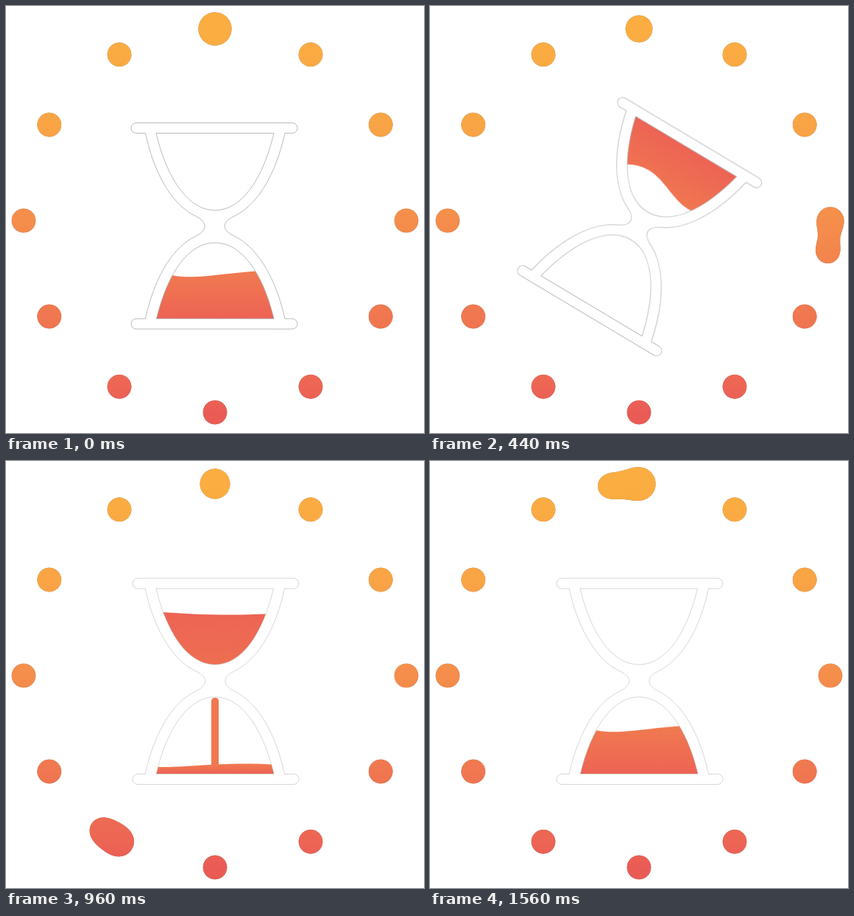
An HTML page without scripts for the animation above (1.6 s loop, 568 by 579 pixels).

```html
<!DOCTYPE html>
<html lang="en">
<head>
<meta charset="utf-8">
<title>Hourglass loader</title>
<style>
  html, body { margin: 0; width: 100%; height: 100%; overflow: hidden; background: #fff; }
  svg { display: block; width: 568px; height: 579px; }

  .ring { filter: drop-shadow(0 0 .5px #888); }
  .dot, .runner { transform-origin: 284px 291px; }
  .dot {
    transform: rotate(calc(var(--i) * 30deg));
    animation: pulse 1.6s linear calc(var(--i) * 1.6s / 12 - 1.6s) infinite;
  }
  .dot.first { animation: swell 1.6s linear infinite; }
  .runner { animation: orbit 1.6s linear infinite; }

  .glass { transform-origin: 284px 298.5px; animation: flip 1.6s infinite; }
  .outline { fill: none; stroke: #aaa; stroke-width: .8; animation: fade 1.6s step-end infinite; }
  .draining { animation: drain 1.6s ease-in-out infinite; }
  .filling { animation: fill 1.6s linear infinite; }
  .stream { animation: pour 1.6s linear infinite; }
  .tint { animation: tint 1.6s linear infinite; }

  @keyframes orbit { to { transform: rotate(360deg); } }
  @keyframes pulse {
    0%, 98.3%, 100% { r: 20.4px; }
    2.5% { r: 17.3px; }
    3.3% { r: 17.1px; }
    4.2%, 95.8% { r: 16px; }
  }
  @keyframes swell {
    0%, 100% { r: 20.4px; }
    2.5% { r: 17.4px; }
    4.2% { r: 16.2px; }
  }
  @keyframes flip {
    0% { transform: rotate(0deg); animation-timing-function: cubic-bezier(.25, 0, .58, 1); }
    34.4% { transform: rotate(227deg); animation-timing-function: ease-in-out; }
    51.2%, 100% { transform: rotate(180deg); }
  }
  @keyframes fade { 0% { stroke-opacity: 1; } 51.2%, 100% { stroke-opacity: .6; } }

  /* Base edge first, then the free surface from right to left */
  @keyframes drain {
    0% { d: path("M200 424C240 424 310 424 372 424L370 358C285 360 245 378 205 358Z"); }
    15% { d: path("M200 424C240 424 310 424 372 424L370 356C300 328 250 340 205 366Z"); }
    27.5% { d: path("M200 424C240 424 310 424 372 424L370 336C300 420 262 318 205 366Z"); }
    37.5% { d: path("M200 424C240 424 310 424 372 424L370 384C300 318 255 352 205 374Z"); }
    52.5% {
      d: path("M200 424C240 424 310 424 372 424L370 341C315 332 260 323 205 314Z");
      animation-timing-function: linear;
    }
    70% {
      d: path("M200 346C240 340 310 338 372 354L370 312C315 312 260 312 205 312Z");
      animation-timing-function: linear;
    }
    81%, 100% { d: path("M200 312C240 312 310 312 372 312L370 312C315 312 260 312 205 312Z"); }
  }
  @keyframes fill {
    0%, 52.5% { d: path("M200 424L205 424C245 424 285 424 370 424L372 424Z"); }
    70% { d: path("M200 424L195 402C240 408 290 384 370 396L372 424Z"); }
    94%, 100% { d: path("M200 424L205 358C245 378 285 360 370 358L372 424Z"); }
  }
  @keyframes pour {
    0%, 50% { transform: translateY(-120px); }
    52.5% { transform: translateY(-89px); }
    58.5%, 81% { transform: translateY(0); }
    88%, 100% { transform: translateY(120px); }
  }
  @keyframes tint { 0%, 52.5% { stop-color: #f07b50; } 70%, 100% { stop-color: #ec6054; } }
</style>
</head>
<body>
<svg viewBox="0 0 568 579">
  <defs>
    <linearGradient id="warm" gradientUnits="userSpaceOnUse" x1="0" y1="31" x2="0" y2="551">
      <stop offset="0" stop-color="#fbad41"/>
      <stop offset=".25" stop-color="#f9a445"/>
      <stop offset=".5" stop-color="#f58d4b"/>
      <stop offset=".75" stop-color="#f07750"/>
      <stop offset=".93" stop-color="#ed6554"/>
      <stop offset="1" stop-color="#ea5b55"/>
    </linearGradient>
    <linearGradient id="oldSand" x2="0" y2="1">
      <stop class="tint" stop-color="#f07b50"/>
      <stop offset="1" stop-color="#ed6354"/>
    </linearGradient>
    <linearGradient id="newSand" x2="0" y2="1">
      <stop stop-color="#f07b50"/>
      <stop offset="1" stop-color="#ed6354"/>
    </linearGradient>

    <filter id="goo" filterUnits="userSpaceOnUse" x="-40" y="-40" width="648" height="659" color-interpolation-filters="sRGB">
      <feGaussianBlur stdDeviation="14"/>
      <feColorMatrix values="1 0 0 0 0  0 1 0 0 0  0 0 1 0 0  0 0 0 50 -14.8" result="blob"/>
      <feMerge><feMergeNode in="blob"/><feMergeNode in="SourceGraphic"/></feMerge>
    </filter>
    <mask id="dots" maskUnits="userSpaceOnUse" x="0" y="0" width="568" height="579" style="mask-type: alpha">
      <g fill="#fff" filter="url(#goo)">
        <circle class="dot first" style="--i:0" cx="284" cy="31" r="16"/>
        <circle class="dot" style="--i:1" cx="284" cy="31" r="16"/>
        <circle class="dot" style="--i:2" cx="284" cy="31" r="16"/>
        <circle class="dot" style="--i:3" cx="284" cy="31" r="16"/>
        <circle class="dot" style="--i:4" cx="284" cy="31" r="16"/>
        <circle class="dot" style="--i:5" cx="284" cy="31" r="16"/>
        <circle class="dot" style="--i:6" cx="284" cy="31" r="16"/>
        <circle class="dot" style="--i:7" cx="284" cy="31" r="16"/>
        <circle class="dot" style="--i:8" cx="284" cy="31" r="16"/>
        <circle class="dot" style="--i:9" cx="284" cy="31" r="16"/>
        <circle class="dot" style="--i:10" cx="284" cy="31" r="16"/>
        <circle class="dot" style="--i:11" cx="284" cy="31" r="16"/>
        <circle class="runner" cx="284" cy="31" r="16"/>
      </g>
    </mask>

    <path id="bulb" d="M204.5 424H364C349 362 320 321 284 321S219.5 362 204.5 424Z"/>
    <clipPath id="inBulb"><use href="#bulb"/></clipPath>
  </defs>

  <g class="ring"><rect width="568" height="579" fill="url(#warm)" mask="url(#dots)"/></g>

  <g clip-path="url(#inBulb)">
    <rect class="stream" x="279" y="321" width="10" height="119" rx="4.5" fill="#f07850"/>
    <path class="filling" fill="url(#newSand)" d="M200 424L205 424C245 424 285 424 370 424L372 424Z"/>
  </g>

  <g class="glass">
    <g clip-path="url(#inBulb)">
      <path class="draining" fill="url(#oldSand)" d="M200 424C240 424 310 424 372 424L370 358C285 360 245 378 205 358Z"/>
    </g>
    <g class="outline">
      <path d="M177 158.5H389a7 7 0 0 1 0 14H379C365 235 338 272 310 285C293 293 293 304 310 312C338 325 365 362 379 424H389a7 7 0 0 1 0 14H177a7 7 0 0 1 0-14H189.5C203 362 230 325 258 312C274 304 274 293 258 285C230 272 203 235 189.5 172.5H177a7 7 0 0 1 0-14Z"/>
      <use href="#bulb"/>
      <path d="M204 172.5H364C349 235 320 277 284 277S219 235 204 172.5Z"/>
    </g>
  </g>
</svg>
</body>
</html>
```
